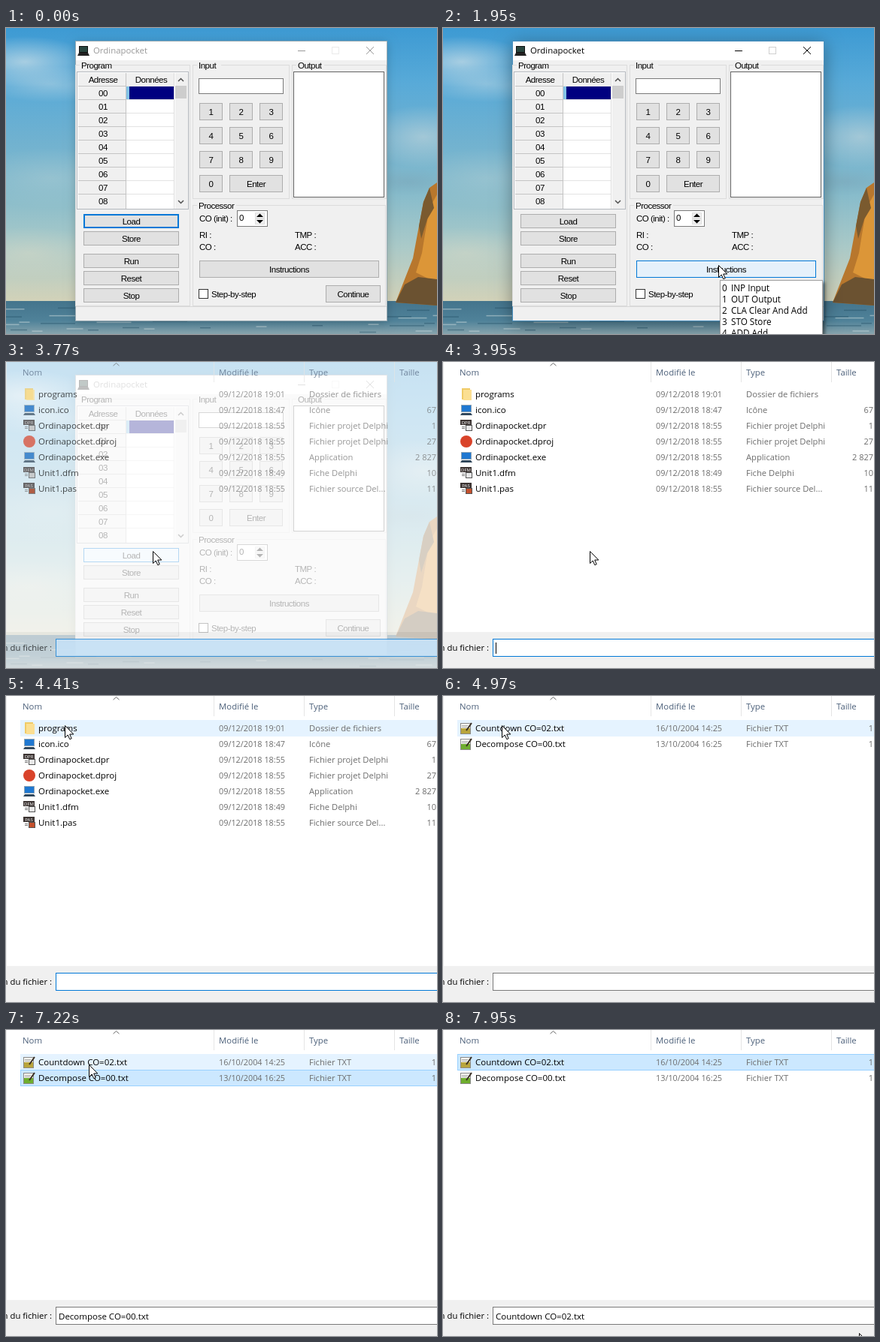
Write an HTML page with a canvas that moves like this. It is 573 by 408 pixels and loops after 8000 ms.

```html
<!DOCTYPE html>
<html lang="fr">
<head>
<meta charset="utf-8">
<title>Ordinapocket</title>
<style>
html, body { margin: 0; width: 100%; height: 100%; overflow: hidden; }
canvas { display: block; width: 573px; height: 408px; }
</style>
</head>
<body>
<canvas id="stage"></canvas>
<script>
const W = 573, H = 408, LOOP = 8000, TICK = 80;
const canvas = document.getElementById('stage');
const dpr = window.devicePixelRatio || 1;
canvas.width = W * dpr;
canvas.height = H * dpr;
const c = canvas.getContext('2d');
c.scale(dpr, dpr);

const UI = '"Open Sans", "Noto Sans", sans-serif';
const BLUE = '#0078d7', GREY = '#adadad';
const between = (t, a, b) => t >= a && t < b;

// ---- drawing helpers ----
function rect(x, y, w, h, fill) {
  c.fillStyle = fill;
  c.fillRect(x, y, w, h);
}
function box(x, y, w, h, fill, border, line = 1) {
  rect(x, y, w, h, border);
  rect(x + line, y + line, w - 2 * line, h - 2 * line, fill);
}
function text(s, x, y, size = 11.3, color = '#000', align = 'left') {
  c.font = `${size}px ${UI}`;
  c.letterSpacing = '0px';
  c.textAlign = align;
  c.fillStyle = color;
  c.fillText(s, x, y + 4);
}
function label(s, x, y, align = 'left') {
  c.font = '11.5px "Liberation Sans", Arial, sans-serif';
  c.letterSpacing = '-0.5px';
  c.textAlign = align;
  c.fillStyle = '#000';
  c.fillText(s, x, Math.round(y) + 4);
}
function poly(points, fill) {
  c.beginPath();
  for (let i = 0; i < points.length; i += 2) c.lineTo(points[i], points[i + 1]);
  c.closePath();
  c.fillStyle = fill;
  c.fill();
}
function lines(color, width, ...paths) {
  c.strokeStyle = color;
  c.lineWidth = width;
  c.beginPath();
  for (const p of paths) {
    c.moveTo(p[0], p[1]);
    for (let i = 2; i < p.length; i += 2) c.lineTo(p[i], p[i + 1]);
  }
  c.stroke();
}
function disc(x, y, r, fill) {
  c.beginPath();
  c.arc(x, y, r, 0, 2 * Math.PI);
  c.fillStyle = fill;
  c.fill();
}

// ---- pointer ----
// time, x, y: eased between neighbours
const PATH = [
  [420, 400, 430], [910, 366, 316],
  [1950, 366, 316], [2440, 195, 252],
  [4030, 195, 252], [4410, 78, 39],
  [5230, 78, 39], [5390, 82, 60],
  [5550, 82, 60], [5630, 83, 61],
  [6270, 83, 61], [6750, 361, 247],
  [7220, 110, 46], [7380, 110, 42],
  [7610, 110, 42], [7950, 553, 404]
];
const CLICKS = [[1070, 1230], [3540, 3620], [4670, 4750], [4830, 4910], [5950, 6030], [7380, 7530]];

function pointerAt(t) {
  const next = PATH.findIndex(p => p[0] > t);
  if (next === 0) return { x: 400, y: 440 };
  if (next < 0) return { x: 553, y: 404 };
  const [t0, x0, y0] = PATH[next - 1], [t1, x1, y1] = PATH[next];
  const u = (t - t0) / (t1 - t0), e = u * u * (3 - 2 * u);
  return { x: Math.round(x0 + (x1 - x0) * e), y: Math.round(y0 + (y1 - y0) * e) };
}
function drawPointer({ x, y }, clicking) {
  if (clicking) disc(x, y + 1, 12, 'rgba(250,226,20,.62)');
  c.save();
  c.translate(x + .5, y + .5);
  const arrow = [0, 0, 0, 16, 3.7, 12.5, 6.3, 18.2, 8.7, 17.2, 6.2, 11.5, 11.3, 11.5];
  poly(arrow, '#fff');
  lines('#000', 1, [...arrow, 0, 0]);
  c.restore();
}

// ---- desktop ----
function glow(x, y, rx, ry, rgb, alpha) {
  c.save();
  c.translate(x, y);
  c.scale(rx, ry);
  const g = c.createRadialGradient(0, 0, 0, 0, 0, 1);
  g.addColorStop(0, `rgba(${rgb},${alpha})`);
  g.addColorStop(1, `rgba(${rgb},0)`);
  rect(-1, -1, 2, 2, g);
  c.restore();
}
function drawDesktop() {
  const sky = c.createLinearGradient(0, 0, 0, 366);
  ['#3d9ad3', '#58aad8', '#6fb1d0', '#86bbcb', '#abcac8', '#d3d2b8']
    .forEach((color, i) => sky.addColorStop(i / 5, color));
  rect(0, 0, W, 366, sky);
  glow(25, 45, 90, 34, '215,228,232', .65);
  glow(60, 75, 90, 24, '190,215,226', .5);
  glow(60, 200, 110, 40, '190,212,214', .35);
  glow(555, 145, 80, 42, '205,218,220', .55);
  glow(535, 205, 60, 18, '120,160,178', .4);
  glow(30, 300, 100, 35, '225,220,198', .4);

  const sea = c.createLinearGradient(0, 364, 0, H);
  sea.addColorStop(0, '#44748c');
  sea.addColorStop(.6, '#4f8299');
  sea.addColorStop(1, '#87a4ad');
  rect(0, 364, W, 44, sea);
  for (let i = 0; i < 50; i++) {
    const x = (i * 137.5) % (W + 40) - 40, y = 367 + (i * 7.3) % 38;
    rect(x, y, 14 + i % 5 * 8, 1.5, i % 2 ? 'rgba(205,220,222,.5)' : 'rgba(35,78,100,.45)');
  }

  poly([573, 206, 563, 213, 555, 232, 549, 264, 541, 307, 530, 335, 518, 366, 573, 370], '#b8772d');
  poly([573, 222, 563, 240, 557, 275, 553, 300, 545, 326, 573, 340], '#dc9638');
  poly([563, 213, 555, 232, 549, 264, 552, 281, 560, 255, 569, 240], '#7a5a2f');
  poly([573, 335, 548, 332, 530, 342, 518, 366, 573, 370], '#6b5231');
}

// ---- application window ----
function button(s, x, y, w, h, ui, focused) {
  const { pointer: p } = ui;
  const over = between(p.x, x, x + w) && between(p.y, y, y + h);
  if (over && ui.clicking) box(x, y, w, h, '#cce4f7', '#005499');
  else if (over) box(x, y, w, h, '#e5f1fb', BLUE);
  else box(x, y, w, h, '#e1e1e1', focused ? BLUE : GREY, focused ? 2 : 1);
  label(s, x + w / 2, y + h / 2 + .5, 'center');
}
function group(s, x, y, w, h) {
  c.strokeStyle = '#dcdcdc';
  c.lineWidth = 1;
  c.strokeRect(x + .5, y + .5, w, h);
  rect(x + 6, y, 7 + s.length * 5, 1, '#f0f0f0');
  label(s, x + 8, y + 1);
}
function drawGrid() {
  box(94, 58, 149, 184, '#fff', '#b4b8be');
  rect(96, 60, 128, 18, '#f0f0f0');
  rect(96, 78, 64, 163, '#f0f0f0');
  label('Adresse', 129, 69, 'center');
  label('Données', 193, 69, 'center');
  for (let i = 0; i < 9; i++) {
    const y = 77 + 18 * i;
    rect(96, y, 64, 1, '#c4c4c4');
    rect(160, y, 64, 1, '#e3e3e3');
    label('0' + i, 129, y + 10, 'center');
  }
  rect(159, 60, 1, 181, '#c4c4c4');
  rect(223, 60, 1, 181, '#dcdcdc');
  rect(160, 78, 4, 17, '#83c3e6');
  rect(164, 78, 59, 17, '#000080');
  rect(225, 60, 17, 181, '#f0f0f0');
  rect(225, 77, 15, 17, '#cdcdcd');
  lines('#505050', 1.5, [229, 71, 232.5, 67.5, 236, 71], [229, 230, 232.5, 233.5, 236, 230]);
}
function drawWindow(t, ui) {
  const active = between(t, 1070, 3700);
  const ink = active ? '#000' : '#999';
  c.save();
  c.shadowColor = active ? 'rgba(0,0,0,.36)' : 'rgba(0,0,0,.2)';
  c.shadowBlur = (active ? 22 : 12) * dpr;
  c.shadowOffsetY = (active ? 4 : 2) * dpr;
  rect(92, 17, 415, 374, '#777');
  c.restore();
  box(92, 17, 415, 374, '#f0f0f0', active ? '#4a8fbd' : '#9aabb3');
  rect(93, 18, 413, 25, '#fff');

  box(97, 24, 12, 9, '#29463f', '#111');
  poly([97, 33, 109, 33, 111, 37, 95, 37], '#222');
  text('Ordinapocket', 116, 30, 11.4, ink);
  lines(ink, 1, [388, 30.5, 398, 30.5], [479, 25, 489, 35], [489, 25, 479, 35]);
  c.strokeStyle = active ? '#d0d0d0' : '#ebebeb';
  c.strokeRect(433.5, 25.5, 9, 9);

  group('Program', 92, 49, 152, 321);
  group('Input', 248, 49, 128, 178);
  group('Output', 380, 49, 125, 178);
  group('Processor', 248, 236, 256, 134);
  rect(93, 371, 413, 1, '#d7d7d7');
  drawGrid();

  const loadFocused = t < 1070 || t >= 3540;
  [['Load', 248], ['Store', 271], ['Run', 301], ['Reset', 324], ['Stop', 347]]
    .forEach(([s, y], i) => button(s, 103, y, 127, 19, ui, i === 0 && loadFocused));

  box(256, 67, 113, 21, '#fff', '#7a7a7a');
  for (let i = 0; i < 9; i++)
    button(String(i + 1), 257 + 40 * (i % 3), 100 + 32 * Math.floor(i / 3), 31, 23, ui);
  button('0', 257, 196, 31, 23, ui);
  button('Enter', 297, 196, 71, 23, ui);
  box(382, 58, 121, 168, '#fff', '#646464');

  label('CO (init) :', 257, 254);
  box(307, 243, 41, 22, '#fff', '#7a7a7a');
  label('0', 310, 253);
  box(331, 246, 13, 8, '#f0f0f0', '#dedede');
  box(331, 254, 13, 8, '#f0f0f0', '#dedede');
  poly([333, 252, 337.5, 247.5, 342, 252], '#000');
  poly([333, 256, 337.5, 260.5, 342, 256], '#000');
  label('RI :', 257, 276);
  label('CO :', 257, 292);
  label('TMP :', 384, 276);
  label('ACC :', 384, 292);
  button('Instructions', 257, 310, 239, 23, ui, between(t, 1070, 3540));
  box(256, 348, 13, 13, '#fff', '#333');
  label('Step-by-step', 273, 355);
  button('Continue', 425, 343, 73, 23, ui);

  if (between(t, 1230, 2030)) drawMenu();
}
function drawMenu() {
  c.save();
  c.shadowColor = 'rgba(0,0,0,.45)';
  c.shadowBlur = 4 * dpr;
  c.shadowOffsetX = c.shadowOffsetY = 3 * dpr;
  rect(368, 336, 137, 90, '#fff');
  c.restore();
  box(368, 336, 137, 90, '#fff', '#a0a0a0');
  ['INP Input', 'OUT Output', 'CLA Clear And Add', 'STO Store', 'ADD Add'].forEach((s, i) => {
    text(i, 371, 347 + 15 * i, 11.7);
    text(s, 383, 347 + 15 * i, 11.7);
  });
}

// ---- file dialog ----
const PROJECT = 'Fichier projet Delphi';
const ROOT = [
  ['programs', '09/12/2018 19:01', 'Dossier de fichiers', '', folderIcon],
  ['icon.ico', '09/12/2018 18:47', 'Icône', '67', screenIcon],
  ['Ordinapocket.dpr', '09/12/2018 18:55', PROJECT, '1', y => tagIcon(y, 'DPR', '#e8e8e8')],
  ['Ordinapocket.dproj', '09/12/2018 18:55', PROJECT, '27', y => disc(31, y, 8, '#d9432a')],
  ['Ordinapocket.exe', '09/12/2018 18:55', 'Application', '2 827', screenIcon],
  ['Unit1.dfm', '09/12/2018 18:49', 'Fiche Delphi', '10', y => tagIcon(y, 'DFM', '#e8e8e8')],
  ['Unit1.pas', '09/12/2018 18:55', 'Fichier source Del...', '11', y => tagIcon(y, 'PAS', '#c4502c')]
];
const PROGRAMS = [
  ['Countdown CO=02.txt', '16/10/2004 14:25', 'Fichier TXT', '1', y => noteIcon(y, '#b9a53c')],
  ['Decompose CO=00.txt', '13/10/2004 16:25', 'Fichier TXT', '1', y => noteIcon(y, '#6fae2e')]
];

function folderIcon(y) {
  rect(25, y - 8, 11, 15, '#f0cb67');
  rect(27, y - 6, 11, 14, '#fbdf92');
}
function screenIcon(y) {
  box(24, y - 7, 14, 10, '#1f78d1', '#8ea4b5');
  poly([25, y + 4, 37, y + 4, 39, y + 7, 23, y + 7], '#31485c');
}
function tagIcon(y, tag, color) {
  box(30, y - 1, 9, 8, color, '#555');
  rect(23, y - 8, 15, 7, '#3c3432');
  text(tag, 30.5, y - 6.5, 6, '#fff', 'center');
  rect(25, y + 1, 4, 1, '#777');
  rect(25, y + 3, 4, 1, '#777');
}
function noteIcon(y, color) {
  box(23, y - 7, 14, 15, '#f6f6f0', '#8a8a8a');
  rect(24, y, 12, 7, color);
  rect(25, y - 4, 8, 1, '#aaa');
  rect(25, y - 2, 7, 1, '#aaa');
  lines('#3a3025', 2, [38, y - 7, 31, y + 3]);
}
function drawDialog(t, { pointer }) {
  rect(0, 0, W, 360, '#fff');
  rect(0, 0, 1, 360, '#ececec');
  rect(0, 360, W, 48, '#f0f0f0');
  [['Nom', 22], ['Modifié le', 283], ['Type', 403], ['Taille', 523]].forEach(([s, x], i) => {
    text(s, x, 14, 11.4, '#4c607a');
    if (i) rect(x - 7, 0, 1, 27, '#e5e5e5');
  });
  lines('#666', 1, [142.5, 5, 146.5, 1.5, 150.5, 5]);

  const files = t < 4890 ? ROOT : t < 4970 ? [] : PROGRAMS;
  const selected = between(t, 4670, 4890) ? 0 : between(t, 5950, 7380) ? 1 : t >= 7380 ? 0 : -1;
  const hovered = Math.floor((pointer.y - 32) / 21);
  files.forEach(([name, date, type, size, icon], i) => {
    const y = 43 + 21 * i;
    if (i === selected) box(19, y - 11, 600, 22, '#cce8ff', '#99d1ff');
    else if (i === hovered) rect(19, y - 11, 600, 22, '#e5f3ff');
    icon(y);
    text(name, 43, y, 11.5);
    text(date, 283, y, 10.85, '#6d6d6d');
    text(type, 403, y, 11.2, '#6d6d6d');
    text(size, 572, y, 11, '#6d6d6d', 'right');
  });

  text('Nom du fichier :', 61, 381, 11.3, '#000', 'right');
  box(66, 369, 600, 24, '#fff', t < 4670 ? BLUE : '#7a7a7a');
  if (between(t, 3860, 4330)) rect(70, 374, 1, 15, '#000');
  if (t >= 5950) text(PROGRAMS[selected][0], 70, 382, 11.5);
}

// ---- timeline ----
function draw(time) {
  const t = Math.floor((time - 8) / TICK) * TICK + 30;
  const ui = {
    pointer: pointerAt(t),
    clicking: CLICKS.some(([a, b]) => between(t, a, b))
  };
  const opening = Math.min(1, Math.max(0, (t - 3620) / 240));
  if (opening < 1) {
    drawDesktop();
    drawWindow(t, ui);
  }
  if (opening > 0) {
    c.globalAlpha = opening;
    drawDialog(t, ui);
    c.globalAlpha = 1;
  }
  drawPointer(ui.pointer, ui.clicking);
}
function loop() {
  draw(performance.now() % LOOP);
  requestAnimationFrame(loop);
}
loop();
</script>
</body>
</html>
```
